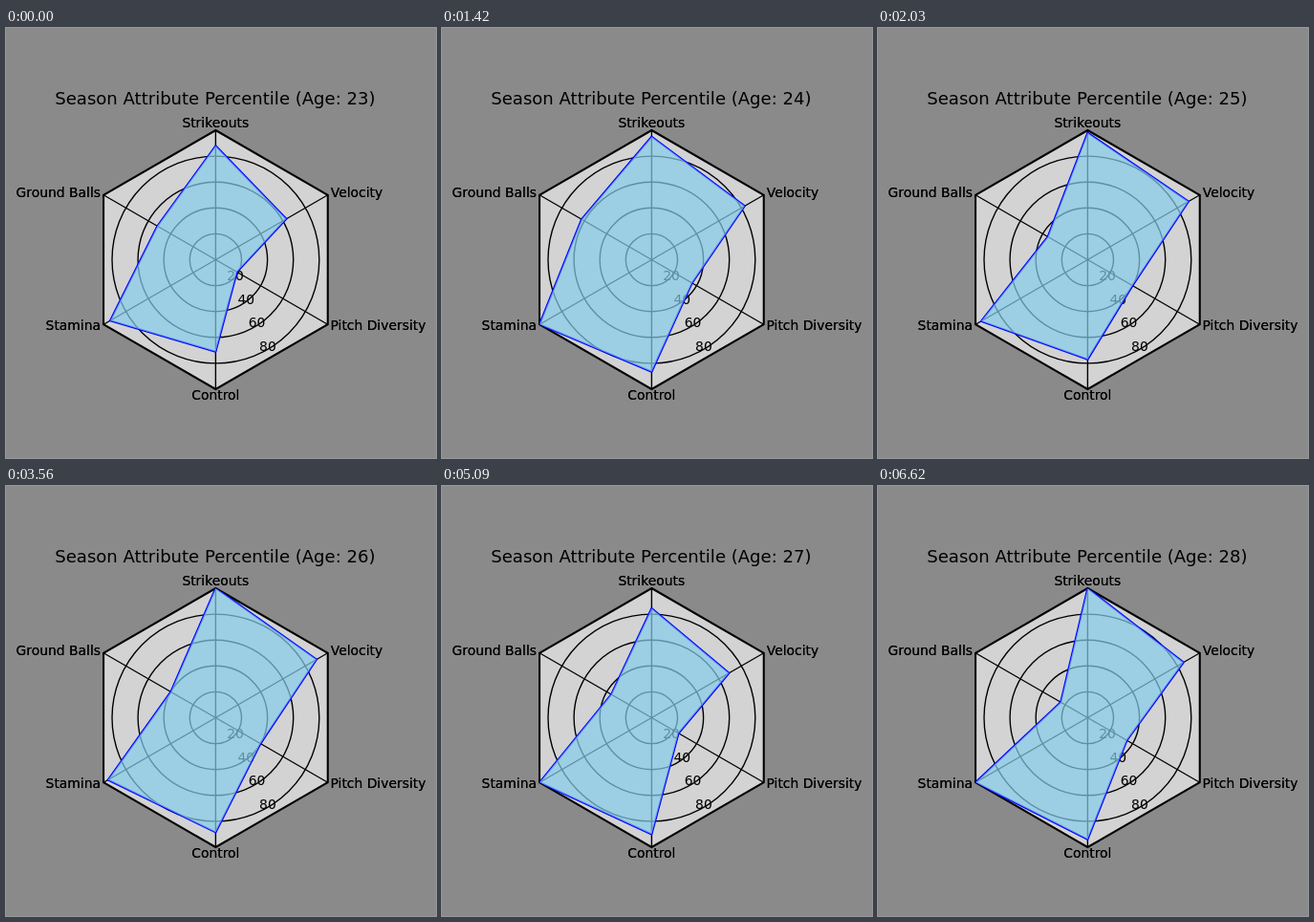
Write an HTML page that moves like this. It is 450 px wide and 450 px high and loops after 8 s.

```html
<!DOCTYPE html>
<html>
<head>
<meta charset="utf-8">
<style>
html, body { margin: 0; width: 100%; height: 100%; overflow: hidden; background: #8a8a8a; }
svg { display: block; width: 450px; height: 450px; font: 13.89px "DejaVu Sans", sans-serif; }
.grid { fill: none; stroke: #000; stroke-width: 1.39; }
</style>
</head>
<body>
<svg id="chart" viewBox="0 0 450 450"></svg>
<script>
const CX = 219.4, CY = 242.5, R = 135.5;
const LOOP = 8000, STEP = 1530, LEAD = 1030, FIRST_AGE = 23;

// Clockwise from the top: label, x, baseline, anchor
const labels = [
  ['Strikeouts', 219.3, 104, 'middle'],
  ['Velocity', 339.8, 177, 'start'],
  ['Pitch Diversity', 339.5, 316, 'start'],
  ['Control', 219.3, 389, 'middle'],
  ['Stamina', 99, 316, 'end'],
  ['Ground Balls', 99, 177, 'end']
];

// One row per season, in label order
const seasons = [
  [88, 63, 19, 71, 94, 52],
  [95, 83, 36, 86.5, 100, 62.5],
  [98, 90, 40, 77, 95, 35.5],
  [100, 90, 40, 88.5, 96, 40],
  [84.5, 69, 24, 90, 100, 36],
  [100, 85.5, 35, 94, 100, 24]
];

const points = values => values.map((v, i) => {
  const a = i * Math.PI / 3, r = v / 100 * R;
  return [CX + r * Math.sin(a), CY - r * Math.cos(a)].map(n => n.toFixed(2)).join();
});
const text = (s, x, y, anchor, extra = '') =>
  `<text x="${x}" y="${y}" text-anchor="${anchor}" ${extra}>${s}</text>`;

const corners = points(Array(6).fill(100));
const hexagon = corners.join(' ');
const spokes = corners.map(p => `M${CX},${CY}L${p}`).join('');
const levels = [20, 40, 60, 80];

// Labels are painted twice, which darkens their soft edges
document.getElementById('chart').innerHTML = `
  <clipPath id="inside"><polygon points="${hexagon}"/></clipPath>
  <polygon points="${hexagon}" fill="#d3d3d3"/>
  <path class="grid" d="${spokes}"/>
  ${levels.map(v => `<circle class="grid" cx="${CX}" cy="${CY}" r="${R * v / 100}"/>`).join('')}
  ${levels.map((v, i) => text(v, 240 + 11.3 * i, Math.floor(264.4 + 24.6 * i), 'middle')).join('')}
  <polygon points="${hexagon}" fill="none" stroke="#000" stroke-width="2.08"/>
  <g clip-path="url(#inside)">
    <polygon class="area" fill="none" stroke="#00f" stroke-width="2.08" stroke-linejoin="round"/>
    <polygon class="area" fill="#87ceeb" fill-opacity=".7"/>
  </g>
  ${[...labels, ...labels].map(l => text(...l)).join('')}
  ${text('', 218.9, 80, 'middle', 'id="title" font-size="18.06"')}`;

const areas = document.querySelectorAll('.area');
const title = document.getElementById('title');
let shown = -1;

function draw() {
  const i = Math.floor((performance.now() % LOOP + LEAD) / STEP);
  if (i !== shown) {
    shown = i;
    const shape = points(seasons[i]).join(' ');
    areas.forEach(a => a.setAttribute('points', shape));
    title.textContent = `Season Attribute Percentile (Age: ${FIRST_AGE + i})`;
  }
  requestAnimationFrame(draw);
}
draw();
</script>
</body>
</html>
```
